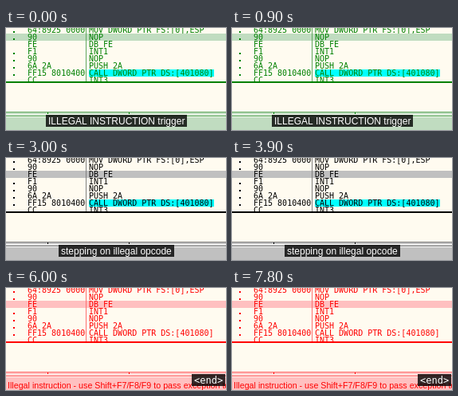
Write an HTML page with a canvas that moves like this. It is 276x128 px and loops after 9000 ms.

```html
<!DOCTYPE html>
<html lang="en">
<head>
<meta charset="utf-8">
<title>Debugger: illegal instruction</title>
<style>
html, body { margin: 0; width: 276px; height: 128px; overflow: hidden; }
canvas { display: block; }
</style>
</head>
<body>
<canvas id="stage" width="276" height="128"></canvas>
<script>
const ctx = document.getElementById('stage').getContext('2d');
const W = 276, H = 128, LOOP = 9000, ROW = 9, SPLIT = 101;
const SANS = '"Liberation Sans", Arial, sans-serif';
const MONO = '"DejaVu Sans Mono", monospace';

const PAPER = '#fffbf0';
const plain = { ink: '#000000', bar: '#c0c0c0', dark: '#808080', light: '#ffffff', mark: '#00ffff' };
const green = { ink: '#008000', bar: '#c0dcc0', dark: '#60a860', light: '#f4fbf0', mark: '#00ffff' };
const red = { ink: '#ff0000', bar: '#ffc0c0', dark: '#ff7070', light: '#fff4f0', mark: PAPER };

const code = [
  ['64:8925 00000000', 'MOV DWORD PTR FS:[0],ESP'],
  ['90', 'NOP'],
  ['FE', 'DB FE'],
  ['F1', 'INT1'],
  ['90', 'NOP'],
  ['6A 2A', 'PUSH 2A'],
  ['FF15 80104000', 'CALL DWORD PTR DS:[401080]'],
  ['CC', 'INT3']
];
const dotted = [0, 1, 3, 4, 5, 6];

const scenes = [
  { at: 0, look: green, row: 1, cap: 'ILLEGAL INSTRUCTION trigger' },
  { at: 1500, look: plain, row: 1 },
  { at: 3000, look: plain, row: 2, cap: 'stepping on illegal opcode' },
  { at: 4500, look: plain, row: 2, msg: true, cap: 'exception triggered' },
  { at: 6000, look: red, row: 2, msg: true, end: '<end>' }
];

function box(x, y, w, h, color) {
  ctx.fillStyle = color;
  ctx.fillRect(x, y, w, h);
}

function text(str, x, y, font, color) {
  ctx.font = font;
  ctx.fillStyle = color;
  ctx.fillText(str, x, y);
}

function clipped(w, h, paint) {
  ctx.save();
  ctx.beginPath();
  ctx.rect(0, 0, w, h);
  ctx.clip();
  paint();
  ctx.restore();
}

function listing(look, active) {
  const font = '10px ' + MONO;
  code.forEach(([hex, asm], i) => {
    const top = 7 + (i - 1) * ROW, base = top + 8;
    if (i === active) box(0, top, W, ROW, look.bar);
    if (asm.startsWith('CALL')) box(104, top, asm.length * 6 + 1, ROW, look.mark);
    if (dotted.includes(i)) box(9, base - 2, 2, 2, look.ink);
    text(asm, 104, base, font, look.ink);
    clipped(SPLIT, H, () => text(hex, 27, base, font, look.ink));
  });
  box(SPLIT - 1, 0, 1, H, look.dark);
}

function panes(look) {
  box(0, 67, W, 2, look.ink);
  box(0, 105, W, 23, look.bar);
  box(0, 105, W, 1, look.dark);
  for (const x of [52, 154]) box(x, 106, 1, 3, look.ink);
  box(0, 108, W, 1, look.light);
  box(0, 110, W, 1, look.dark);
  box(0, 111, W, 1, look.light);
}

function caption(str, font, left, top) {
  ctx.font = font;
  const w = Math.round(ctx.measureText(str).width) + 6;
  const x = Math.round(left(w));
  box(x, top, w, 15, 'rgba(0, 0, 0, 0.8)');
  text(str, x + 3, top + 12, font, '#fff');
}

function draw(t) {
  const { look, row, msg, cap, end } = scenes.filter(s => s.at <= t).pop();
  box(0, 0, W, H, PAPER);
  clipped(W, 68, () => listing(look, row));
  panes(look);
  if (msg) text('Illegal instruction - use Shift+F7/F8/F9 to pass exception to program', 2, 126, '10.7px ' + SANS, look.ink);
  if (cap) caption(cap, '12px ' + SANS, w => (W - w) / 2, 109);
  if (end) caption(end, '12px ' + MONO, w => W - 1 - w, 108);
}

const start = performance.now();
function tick() {
  draw((performance.now() - start) % LOOP);
  requestAnimationFrame(tick);
}
tick();
</script>
</body>
</html>
```
